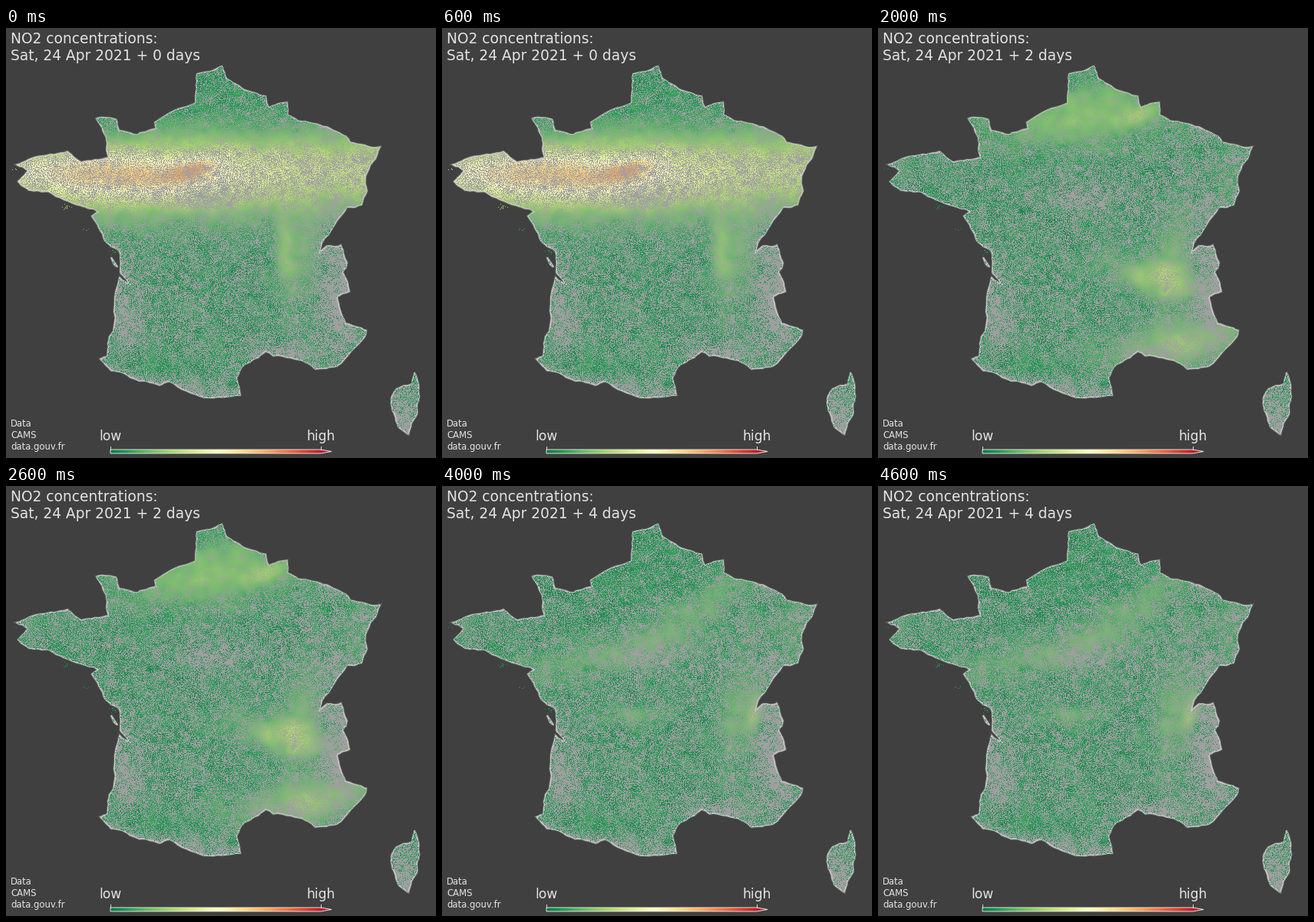
A matplotlib script for the animation above (5 s loop, 560 px wide and 560 px high).

```python
import numpy as np
import matplotlib.pyplot as plt
from matplotlib.animation import FuncAnimation
from matplotlib.patches import Polygon
from matplotlib.path import Path

SIZE, DPI = 560, 100
BG, LAND, EDGE, INK = "#404040", "#a0a0a0", "#c6c6c6", "#e2e2e2"
CMAP = plt.get_cmap("RdYlGn_r")
rng = np.random.default_rng(24)
X, Y = np.meshgrid(np.arange(SIZE) + .5, np.arange(SIZE) + .5)

# Key points of the coast; finer detail comes from roughen()
west = [(281, 50), (249, 60), (247, 98), (194, 123), (196, 131), (172, 139),
        (147, 134), (143, 119), (118, 118), (131, 143), (134, 169), (98, 175),
        (80, 161), (45, 167), (14, 178), (29, 186), (16, 200), (30, 211),
        (56, 213), (97, 231), (121, 240), (112, 245), (129, 277), (147, 289),
        (149, 318), (162, 334), (148, 325), (140, 395), (132, 428), (123, 431)]
east = [(137, 446), (165, 456), (200, 465), (213, 460), (258, 481), (305, 478),
        (300, 455), (310, 438), (338, 421), (382, 432), (403, 444), (431, 440),
        (467, 402), (469, 394), (442, 385), (431, 350), (447, 343), (438, 318),
        (444, 306), (436, 283), (418, 284), (408, 293), (411, 280), (444, 233),
        (463, 230), (468, 193), (487, 155), (448, 149), (418, 129), (380, 121),
        (366, 113), (366, 97), (342, 104), (338, 89), (309, 80), (287, 66)]
corsica = [(532, 449), (538, 480), (535, 503), (524, 529), (511, 519),
           (503, 495), (502, 483), (509, 470), (529, 464)]

# Bumps: x, y, sigma x, sigma y, tilt in degrees, height
relief = [(384, 300, 17, 48, 10, .1), (462, 190, 14, 34, 12, .05)]
days = [
    [(230, 192, 260, 36, -2, .36), (125, 188, 85, 20, 3, .22),
     (242, 186, 26, 9, -18, .2), (362, 290, 8, 34, 0, .12)],
    [(235, 128, 85, 24, -20, .16), (28, 190, 32, 18, 0, .24),
     (180, 290, 75, 19, 3, .23), (355, 322, 58, 34, 0, .25)],
    [(270, 112, 95, 30, -8, .15), (338, 116, 25, 9, -20, .09),
     (362, 326, 48, 17, 14, .17), (395, 410, 65, 20, -8, .17)],
    [(260, 146, 100, 19, -22, .16), (60, 176, 50, 17, 0, .13),
     (435, 220, 40, 24, -48, .13), (220, 284, 90, 10, 0, .09)],
    [(345, 148, 72, 16, -35, .09), (210, 222, 120, 17, -12, .08),
     (409, 293, 7, 18, 12, .16), (250, 298, 30, 9, 0, .09)],
]
towns = [(270, 95, 75, 45, 0, .2), (265, 222, 30, 15, 0, -.25),
         (150, 378, 22, 40, 0, -.28), (436, 345, 24, 60, -5, -.4),
         (215, 468, 95, 9, 10, -.36), (362, 424, 28, 9, 0, -.35),
         (180, 438, 45, 14, 10, .18), (517, 510, 14, 22, 0, -.4)]


def surface(base, bumps):
    z = np.full(X.shape, base)
    for x, y, sx, sy, tilt, h in bumps:
        c, s = np.cos(np.radians(tilt)), np.sin(np.radians(tilt))
        u, v = (X - x) * c + (Y - y) * s, (Y - y) * c - (X - x) * s
        z += h * np.exp(-.5 * ((u / sx) ** 2 + (v / sy) ** 2))
    return z


def blur(a, r):
    for axis in (0, 1):
        a = sum(np.roll(a, k, axis) for k in range(-r, r + 1)) / (2 * r + 1)
    return a


def smooth_noise(r):
    a = blur(blur(rng.standard_normal(X.shape), r), r)
    return a / a.std()


def roughen(points, rounds=3, amount=.045):
    """Midpoint displacement in proportion to each segment's length."""
    p = np.array(points, float)
    for _ in range(rounds):
        step = np.roll(p, -1, 0) - p
        normal = step[:, ::-1] * (1, -1)
        mid = p + step / 2 + normal * rng.normal(0, amount, (len(p), 1))
        p = np.stack([p, mid], 1).reshape(-1, 2)
    return p


def inside(shape):
    hits = Path(shape).contains_points(np.c_[X.ravel(), Y.ravel()])
    return hits.reshape(X.shape)


shapes = [roughen(west + east), roughen(corsica),
          np.array([(137, 299), (145, 311), (141, 308)])]
land = np.any([inside(s) for s in shapes], axis=0)

# Scattered towns: ranked, slightly evened noise, cut at the local density
grain = rng.random(X.shape)
grain -= .7 * blur(grain, 1)
rank = grain.ravel().argsort().argsort().reshape(X.shape) / grain.size
veins = np.exp(-(smooth_noise(4) / .22) ** 2) * (X > 230) * (Y < 260)
density = surface(.46, towns) + .1 * smooth_noise(2) - .22 * veins
dots = land & (rank < np.clip(density, .02, .8))
for x, y, spread, n in ((10, 183, 2, 3), (78, 233, 4, 16), (104, 262, 3, 5),
                        (139, 291, 3, 16)):
    px, py = np.rint(rng.normal((x, y), (spread, spread / 2), (n, 2))).astype(int).T
    dots[py, px] = True
cover = np.clip(blur(density, 3) * 1.7, 0, 1)
wobble = .012 * smooth_noise(5)


def paint(bumps):
    v = np.clip(surface(.09, relief + bumps) + wobble, .05, .95)
    rgba = CMAP(v)
    haze = cover * (.04 + .5 * np.exp(-((v - .25) / .08) ** 2))
    rgba[..., 3] = np.where(dots, .9, np.where(land, haze, 0))
    return rgba


layers = [paint(day) for day in days]

fig = plt.figure(figsize=(SIZE / DPI, SIZE / DPI), dpi=DPI, facecolor=BG)
ax = fig.add_axes([0, 0, 1, 1])
ax.axis("off")


def label(x, y, text, px, ha="left"):
    return ax.text(x, y, text, fontsize=px * 72 / DPI, color=INK, ha=ha,
                   va="baseline", family="DejaVu Sans")


for s in shapes:
    ax.add_patch(Polygon(s, fc="none", ec=EDGE, lw=2.4, alpha=.3, zorder=1))
    ax.add_patch(Polygon(s, fc=LAND, ec=EDGE, lw=1.2, joinstyle="round", zorder=1))
cloud = ax.imshow(layers[0], extent=(0, SIZE, SIZE, 0), aspect="auto",
                  interpolation="nearest", zorder=2)

label(6, 20, "NO2 concentrations:", 18.67)
title = label(6, 42, "", 18.67)
for i, text in enumerate(("Data", "CAMS", "data.gouv.fr")):
    label(6, 519 + 15 * i, text, 11.67)

# Colour bar with a pointed end
L, R, TOP, BOTTOM, TIP = 136, 410, 549, 554, 424
MID = (TOP + BOTTOM) / 2
ax.imshow(np.linspace(.04, .94, 256)[None], cmap=CMAP, vmin=0, vmax=1, aspect="auto",
          extent=(L, R, BOTTOM, TOP), zorder=3)
ax.add_patch(Polygon([(R, TOP), (TIP, MID), (R, BOTTOM)], fc=CMAP(.94), ec="none",
                     zorder=3))
ax.add_patch(Polygon([(L, TOP), (R, TOP), (TIP, MID), (R, BOTTOM), (L, BOTTOM)],
                     fc="none", ec=INK, lw=.7, zorder=4))
for x, text in ((L, "low"), (R, "high")):
    ax.plot([x, x], [TOP - 4, TOP], color=INK, lw=.7, zorder=4)
    label(x, 537, text, 17.1, "center")

ax.set_xlim(0, SIZE)
ax.set_ylim(SIZE, 0)


def update(day):
    cloud.set_data(layers[day])
    title.set_text(f"Sat, 24 Apr 2021 + {day} days")
    return cloud, title


anim = FuncAnimation(fig, update, frames=len(layers), interval=1000,
                     repeat=True, repeat_delay=0)
plt.show()
```
